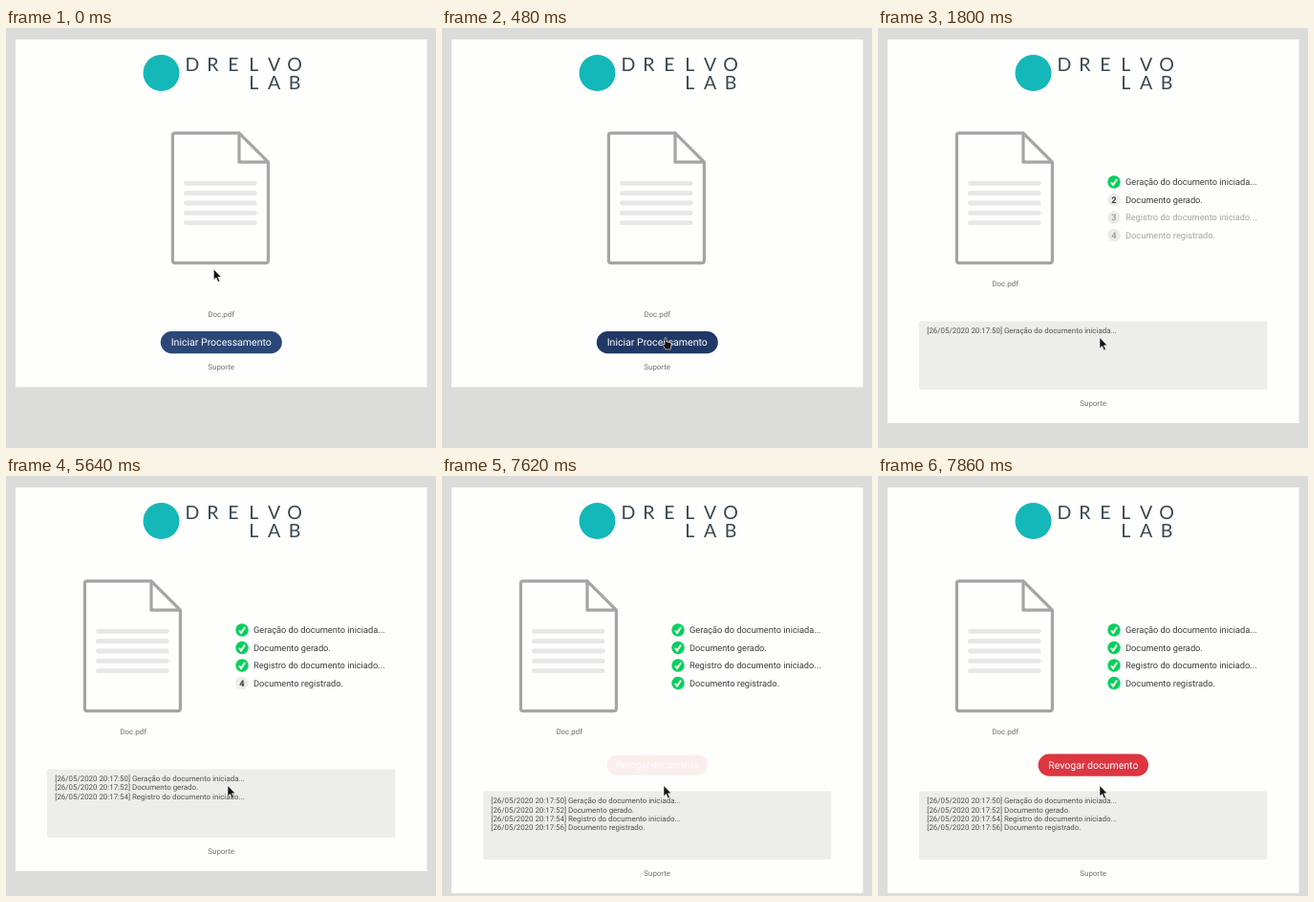
These frames come from a looping animation (450 by 439 pixels, 8040 ms). An HTML page:

```html
<!DOCTYPE html>
<html lang="pt">
<head>
<meta charset="utf-8">
<title>Registro de documento</title>
<style>
  html, body { margin: 0; height: 100%; overflow: hidden; background: #dcdcdb; }
  svg { display: block; width: 450px; height: 439px; }
  text { font-family: Roboto, sans-serif; text-rendering: geometricPrecision; }
  .mid { text-anchor: middle; }
  .small { font-size: 7.92px; fill: #707070; }
  .log { font-size: 7.92px; fill: #505050; }
  .step { font-size: 9.24px; }
  .num { font-size: 9.24px; font-weight: 700; }
  .btn { font-size: 10.56px; fill: #fff; }
  .brand { font: 400 19.5px Lato, sans-serif; fill: #37474f; }
</style>
</head>
<body>
<svg id="stage" viewBox="0 0 450 439"></svg>
<script>
const LOOP = 8040, TICK = 60;
const STEP_TIMES = [1800, 3780, 5640, 7620];
const STEPS = ['Geração do documento iniciada...', 'Documento gerado.',
               'Registro do documento iniciado...', 'Documento registrado.'];

const stage = document.getElementById('stage');
const clamp = v => Math.min(1, Math.max(0, v));
const smooth = v => v * v * (3 - 2 * v);
const mix = (a, b, k) => a + (b - a) * k;
const mixRgb = (a, b, k) => `rgb(${a.map((v, i) => Math.round(mix(v, b[i], k)))})`;

const text = (x, y, cls, s, extra = '') => `<text x="${x}" y="${y}" class="${cls}" ${extra}>${s}</text>`;
const rect = (x, y, w, h, fill, r = 0) =>
  `<rect x="${x}" y="${y}" width="${w}" height="${h}" rx="${r}" fill="${fill}"/>`;

function brand() {
  const row = (word, first, y) => [...word].map((c, i) =>
    text(195 + 21.4 * (first + i), y, 'brand mid', c)).join('');
  return '<circle cx="162.5" cy="47" r="19" fill="#14b8b8"/>' + row('DRELVO', 0, 45) + row('LAB', 3, 64);
}

function sheet(dx) {
  let lines = '';
  for (let i = 0; i < 5; i++) lines += rect(186, 160 + 10.3 * i, 76.5, 4.8, '#e7e7e7', 2.2);
  return `<g transform="translate(${dx})">${lines}
    <path d="M244 109.8H177q-2.6 0-2.6 2.6V243q0 2.6 2.6 2.6h94.8q2.6 0 2.6-2.6V140.2L244 109.8V140.2H274.4"
      fill="none" stroke="#a5a5a5" stroke-width="3.2" stroke-linejoin="round"/></g>`;
}

const button = (w, y, fill, label) =>
  rect(225.3 - w / 2, y, w, 23.2, fill, 11.6) + text(225.3, y + 15.3, 'btn mid', label);

function stepRow(i, done) {
  const y = 161 + 18.5 * i, ink = i <= done ? '#3a3a3a' : '#a3a3a3';
  const badge = i < done
    ? `<circle cx="247" cy="${y}" r="6.7" fill="#06d05c"/>
       <path d="M243.9 ${y + .4}l2.2 2.6 4-6" fill="none" stroke="#fff" stroke-width="2"/>`
    : `<circle cx="247" cy="${y}" r="6.7" fill="#ececeb"/>` + text(247, y + 3.3, 'num mid', i + 1, `fill="${ink}"`);
  return badge + text(259, y + 3.3, 'step', STEPS[i], `fill="${ink}"`);
}

const cursor = (x, y, hand) => {
  const d = hand
    ? 'M1 .8q1.1-1.2 2 0V4.6l3.6.8q1.5.5 1.4 2.2L7.2 12.6H2L-.6 8.4q-.5-1.4.6-1.5L1 7.8z'
    : 'M0 0V11.3L2.6 8.9 4.5 13.4 6.4 12.6 4.5 8.3H8z';
  return `<path d="${d}" transform="translate(${x} ${y})" fill="#111" stroke="#fff" stroke-width=".6"/>`;
};

function startView(t) {
  const move = smooth(clamp(t / 360));
  const x = mix(217.3, 232, move), y = mix(252, 323.3, move);
  const fill = mixRgb([43, 71, 119], [32, 56, 101], clamp((t - 300) / 180));
  return rect(10, 12, 430.5, 363.3, '#fefefd') + brand() + sheet(0) +
    text(225.2, 301.8, 'small mid', 'Doc.pdf') +
    button(127, 317, fill, 'Iniciar Processamento') +
    text(225.2, 357.3, 'small mid', 'Suporte') + cursor(x, y, y > 317);
}

function progressView(t) {
  const done = STEP_TIMES.filter(s => t >= s).length;
  const finished = done === STEPS.length, dy = finished ? 23.1 : 0;
  let out = rect(10, 12, 430.5, 401 + dy, '#fefefd') + brand() + sheet(-92) +
    text(133.2, 270, 'small mid', 'Doc.pdf') + rect(43, 306.5 + dy, 364.3, 71.5, '#ededeb', 2);
  STEPS.forEach((label, i) => {
    out += stepRow(i, done);
    if (i < done)
      out += text(51.3, 319.2 + dy + 9.24 * i, 'log', `[26/05/2020 20:17:${50 + 2 * i}] ${label}`);
  });
  if (finished) {
    const k = clamp((t - 7620) / 240), scale = mix(.917, 1, k);
    out += `<g opacity="${mix(.07, 1, k)}" transform="translate(225.3 302) scale(${scale}) translate(-225.3 -302)">
      ${button(115.4, 290.5, '#dc3640', 'Revogar documento')}</g>`;
  }
  return out + text(225.2, 395 + dy, 'small mid', 'Suporte') + cursor(232, 323.5, false);
}

let shown = -1;
function frame(now) {
  const t = Math.floor(now % LOOP / TICK) * TICK;
  if (t !== shown) stage.innerHTML = t < STEP_TIMES[0] ? startView(t) : progressView(t);
  shown = t;
  requestAnimationFrame(frame);
}
frame(0);
</script>
</body>
</html>
```
